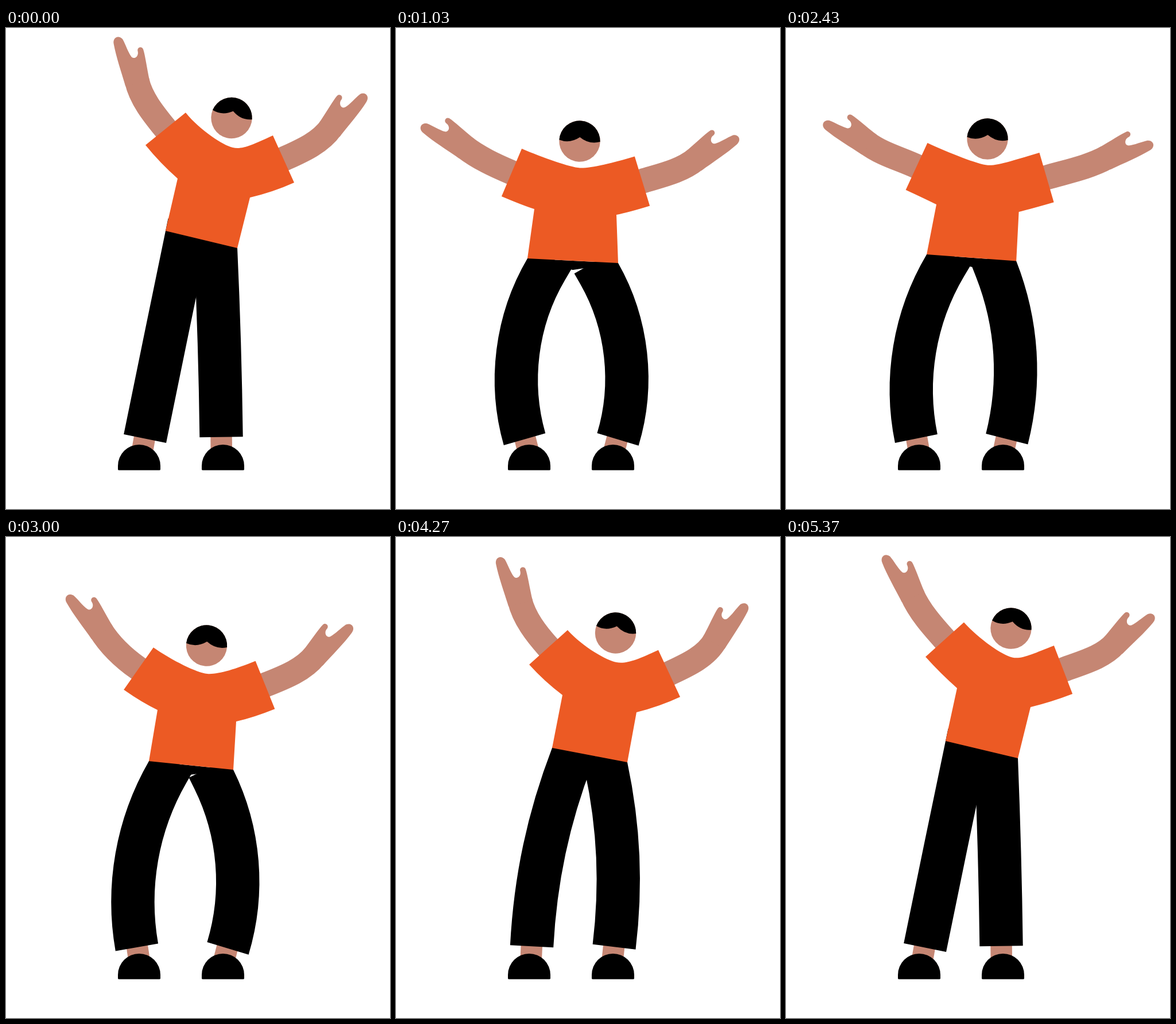
Recreate the animation shown at these times as an HTML page with a canvas. Size 669 by 837 pixels, loop 5.41 s.

```html
<!DOCTYPE html>
<html lang="en">
<head>
<meta charset="utf-8">
<title>Dancer</title>
<style>
html, body { margin: 0; width: 100%; height: 100%; overflow: hidden; background: #fff; }
canvas { display: block; width: 100vw; height: 100vh; }
</style>
</head>
<body>
<canvas id="stage" width="669" height="837"></canvas>
<script>
const ctx = document.getElementById('stage').getContext('2d');
const SKIN = '#c58673', SHIRT = '#ec5a24', BLACK = '#000';
const LOOP = 5410, FRAMES = 162, CYCLE = 40.5, HALF = CYCLE / 2, MID = 305;
const RAD = Math.PI / 180;

// One side of the body over a full sway; the other side runs half a cycle later.
// x is measured outward from the middle, angles are elevations in degrees.
// phase, sleeve x, y, angle, hand x, y, angle
const ARM = [
  [0, 27, 175.5, 51, 82, 52, 77],
  [3.5, 30, 179, 51, 82, 48, 79],
  [6.5, 39.5, 192, 48, 95, 71, 76],
  [9, 74, 229, 35, 158, 126, 58],
  [10.75, 124, 266.5, 17, 246, 200, 39],
  [14.5, 166, 242, 16, 304, 203, 18],
  [16.5, 172.5, 230, 17.4, 303, 191, 8],
  [19.25, 178, 231, 21, 292, 153, 48],
  [20.25, 178.5, 228, 24.3, 281, 138, 55],
  [26.75, 171, 237.5, 25, 267, 143, 61],
  [29.25, 146.5, 257.5, 22, 255, 173, 51],
  [31, 103.5, 251.5, 23, 215, 179, 38],
  [36.75, 41.5, 198, 35.6, 154, 115, 36],
  [39.5, 28.5, 178.5, 48, 98, 62, 66]
];
// phase, armpit x, y, waist x, y, cuff slant
const TRUNK = [
  [0, 6, 262, 27, 353, -.2],
  [6.5, 15, 275, 33, 367, -.053],
  [9, 41, 301, 56, 390, .173],
  [10.75, 79, 325, 82, 409, .29],
  [16.5, 120, 295, 106, 386, 0],
  [19.25, 121, 296, 99, 385, -.013],
  [20.25, 120, 295, 98, 383, -.013],
  [26.75, 114, 305, 98, 392, .12],
  [29.25, 96, 321, 91, 405, .29],
  [31, 64, 315, 76, 401, .276],
  [36.75, 11, 278, 23, 367, -.13],
  [39.5, 7, 263, 27, 355, -.2]
];
// phase, head x, y, collar y
const HEAD_HALF = [
  [0, 88, 156.5, 208],
  [6.5, 77.5, 167, 218],
  [9, 44.5, 189, 238],
  [10.75, -15, 197, 243.5],
  [16.5, -72.5, 167, 211.5],
  [19.25, -87, 159, 209.5]
];
const HEAD = HEAD_HALF.concat(HEAD_HALF.map(([p, x, y, c]) => [p + HALF, -x, y, c]));

const HAND = new Path2D('M-45 25.5C-20 27 10 30 31 29C43 29 46 17 36 12C26 9 12 8 3 4' +
  'C-1 2-1-3 2-6C5-9 8-9 11-9C17-10 17-18 11-19C0-20-20-18-45-17.5Z');

// Cyclic cubic interpolation that never overshoots its keys.
function sample(keys, phase) {
  const n = keys.length, p = ((phase % CYCLE) + CYCLE) % CYCLE;
  let i = n - 1;
  while (keys[i][0] > p) i--;
  const key = j => keys[(j + n) % n];
  const gap = j => (key(j + 1)[0] - key(j)[0] + CYCLE) % CYCLE;
  const rise = (j, k) => (key(j + 1)[k] - key(j)[k]) / gap(j);
  const slope = (j, k) => {
    const a = rise(j - 1, k), b = rise(j, k);
    if (a * b <= 0) return 0;
    const h = gap(j - 1), g = gap(j), m = (a * g + b * h) / (g + h);
    return Math.sign(m) * Math.min(Math.abs(m), 3 * Math.abs(a), 3 * Math.abs(b));
  };
  const h = gap(i), t = (p - key(i)[0]) / h, u = 1 - t;
  return key(i).slice(1).map((v, c) => {
    const k = c + 1;
    return v * (1 + 2 * t) * u * u + key(i + 1)[k] * t * t * (3 - 2 * t) +
      h * (slope(i, k) * t * u * u - slope(i + 1, k) * t * t * u);
  });
}

function pose(phase) {
  const [sx, sy, sa, hx, hy, ha] = sample(ARM, phase);
  const [ax, ay, wx, wy, slant] = sample(TRUNK, phase);
  const c = Math.cos(sa * RAD), s = Math.sin(sa * RAD);
  return {
    sx, sy, c, s, hx, hy, ha: ha * RAD, wx, wy, slant,
    pit: [ax, ay],
    waist: [wx, wy],
    top: [sx - 45 * s, sy - 45 * c],
    low: [sx + 45 * s, sy + 45 * c]
  };
}

function tube(color, width, start, ...curve) {
  ctx.strokeStyle = color;
  ctx.lineWidth = width;
  ctx.beginPath();
  ctx.moveTo(...start);
  for (const part of curve) part.length > 2 ? ctx.bezierCurveTo(...part) : ctx.lineTo(...part);
  ctx.stroke();
}

function drawArm(b) {
  const c = Math.cos(b.ha), s = Math.sin(b.ha);
  const wx = b.hx - 40 * c + 4 * s, wy = b.hy + 40 * s + 4 * c;
  const k = Math.hypot(wx - b.sx, wy - b.sy) / 3;
  tube(SKIN, 43, [b.sx - 10 * b.c, b.sy + 10 * b.s], [b.sx, b.sy],
    [b.sx + k * b.c, b.sy - k * b.s, wx - k * c, wy + k * s, wx, wy]);
  ctx.save();
  ctx.translate(b.hx, b.hy);
  ctx.rotate(-b.ha);
  ctx.fillStyle = SKIN;
  ctx.fill(HAND);
  ctx.restore();
}

// The leg bends as one arc between waist and cuff.
function drawLeg(b) {
  const half = 37.7, s = b.slant, c = Math.sqrt(1 - s * s);
  const x = 70.5 + 38 * s, y = 711.5 + 15 * Math.abs(s);
  const dx = x + half * c - b.wx, dy = y + half * s - b.wy;
  const g = 2 * Math.atan2(dx, dy) + Math.asin(s);
  const gx = Math.sin(g), gy = Math.cos(g);
  const px = b.wx - half * gy, py = b.wy + half * gx;
  const k = Math.hypot(x - px, y - py) * .345;
  tube(SKIN, 37.5, [x, y - 5], [x - 32 * s, y + 32 * c]);
  tube(BLACK, half * 2, [px - 22 * gx, py - 22 * gy], [px, py],
    [px + k * gx, py + k * gy, x + k * s, y - k * c, x, y]);
  ctx.fillStyle = BLACK;
  ctx.beginPath();
  ctx.arc(73, 762, 37, Math.PI, 0);
  ctx.lineTo(110, 768);
  ctx.quadraticCurveTo(110, 769.6, 108, 769.6);
  ctx.lineTo(38, 769.6);
  ctx.quadraticCurveTo(36, 769.6, 36, 768);
  ctx.fill();
}

function drawHips(l, r) {
  ctx.fillStyle = BLACK;
  ctx.beginPath();
  ctx.moveTo(-l.wx, l.wy);
  ctx.lineTo(r.wx, r.wy);
  ctx.lineTo((r.wx - l.wx) / 2, (l.wy + r.wy) / 2 + 16);
  ctx.fill();
}

function drawShirt(l, r, collar, tilt) {
  const left = ([x, y]) => [-x, y];
  const inward = (b, [x, y], d) => [x - d * b.c, y + d * b.s];
  const nx = 17 * Math.cos(tilt), ny = 17 * Math.sin(tilt), [cx, cy] = collar;
  ctx.fillStyle = SHIRT;
  ctx.beginPath();
  ctx.moveTo(...left(l.top));
  ctx.bezierCurveTo(...left(inward(l, l.top, 40)), cx - nx, cy - ny, cx, cy);
  ctx.bezierCurveTo(cx + nx, cy + ny, ...inward(r, r.top, 40), ...r.top);
  ctx.lineTo(...r.low);
  ctx.quadraticCurveTo(...inward(r, r.low, 40), ...r.pit);
  ctx.lineTo(...r.waist);
  ctx.lineTo(...left(l.waist));
  ctx.lineTo(...left(l.pit));
  ctx.quadraticCurveTo(...left(inward(l, l.low, 40)), ...left(l.low));
  ctx.fill();
}

function drawHead(x, y, tilt) {
  const R = 35.7, h = Math.max(-5, Math.min(0, (y - 189) * 5 / 22));
  ctx.save();
  ctx.translate(x, y);
  ctx.rotate(tilt);
  ctx.beginPath();
  ctx.arc(0, 0, R, 0, 2 * Math.PI);
  ctx.fillStyle = SKIN;
  ctx.fill();
  const a = Math.asin((h - .7) / R), ex = R * Math.cos(a);
  ctx.beginPath();
  ctx.arc(0, 0, R, Math.PI - a, 2 * Math.PI + a);
  ctx.quadraticCurveTo(17, h + 5.5, 0, h - 7);
  ctx.quadraticCurveTo(-17, h + 5.5, -ex, h - .7);
  ctx.fillStyle = BLACK;
  ctx.fill();
  ctx.restore();
}

function draw(phase) {
  const l = pose(phase), r = pose(phase + HALF);
  const [hx, hy, cy] = sample(HEAD, phase);
  const tilt = Math.atan2(r.wy - l.wy, l.wx + r.wx);
  ctx.fillStyle = '#fff';
  ctx.fillRect(0, 0, 669, 837);
  ctx.save();
  ctx.translate(MID, 0);
  for (const [b, dir] of [[l, -1], [r, 1]]) {
    ctx.save();
    ctx.scale(dir, 1);
    drawArm(b);
    drawLeg(b);
    ctx.restore();
  }
  drawHips(l, r);
  drawShirt(l, r, [hx + 14 * Math.sin(Math.abs(tilt)) * .6, cy], tilt);
  drawHead(hx, hy, tilt);
  ctx.restore();
}

const start = performance.now();
function tick() {
  const t = (performance.now() - start) % LOOP;
  const step = Math.min(FRAMES - 1, Math.floor(t * .03 + .15));
  draw(step % CYCLE);
  requestAnimationFrame(tick);
}
tick();
</script>
</body>
</html>
```
